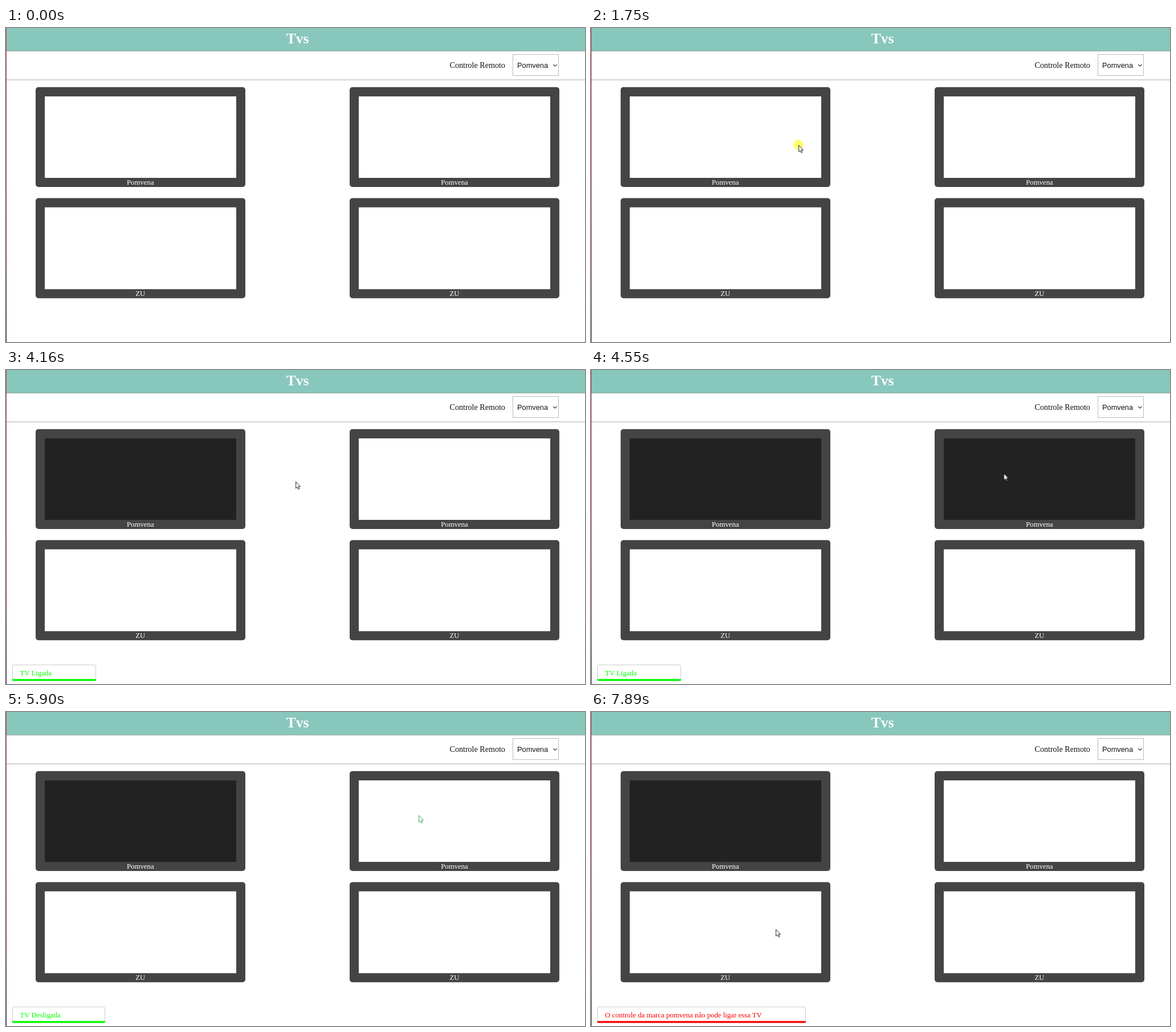
Recreate the animation shown at these times as an HTML page. Size 1016 px wide and 551 px high, loop 8 s.

```html
<!DOCTYPE html>
<html lang="pt-BR">
<head>
<meta charset="utf-8">
<title>Tvs</title>
<style>
  html, body { margin: 0; width: 100%; height: 100%; overflow: hidden; background: #fff; }
  svg { display: block; width: 1016px; height: 551px; }
  text { font: 12.8px "Liberation Serif", "Times New Roman", serif; fill: #fff; }
  .mid { text-anchor: middle; }
  .title { font-size: 25.6px; font-weight: bold; }
  .remote { font-size: 14.08px; fill: #111; }
  .option { font-family: "Liberation Sans", Arial, sans-serif; fill: #111; }
  .frame { fill: #444; }
  .screen { fill: #fff; }

  /* One shared 8 s clock: percent = ms / 80 */
  .anim { animation: 8s step-end infinite; }
  #tv1 { animation-name: tv1; }
  #tv2 { animation-name: tv2; }
  #click { animation-name: click; fill: #ff0; opacity: .55; transform: translate(-50px, -50px); }
  #cursor { animation-name: cursor, tint; fill: #fff; stroke: #000; stroke-width: .9; }
  #on { animation-name: on; }
  #off { animation-name: off; }
  #offBar { animation-name: offBar; }
  #error { animation-name: error; }
  .toast { transform: translateX(-420px); }
  .box { fill: #fff; stroke: #ccc; }
  .green { fill: #0f0; }
  .red { fill: #f00; }

  @keyframes tv1 { 0% { fill: #fff; } 23.5%, 100% { fill: #222; } }
  @keyframes tv2 { 0% { fill: #fff; } 56.875% { fill: #222; } 73.75%, 100% { fill: #fff; } }

  @keyframes click {
    0%, 23.5%, 56.875%, 73.75%, 91.75%, 100% { transform: translate(-50px, -50px); }
    21.875% { transform: translate(364px, 205px); }
    55.25%, 72.875% { transform: translate(724px, 181px); }
    90.875% { transform: translate(324px, 382px); }
  }

  @keyframes cursor {
    0% { transform: translate(668px, 574px); }
    5.75% { transform: translate(668px, 574px); animation-timing-function: steps(7, start); }
    11.6% { transform: translate(521px, 322.5px); }
    13.25% { transform: translate(521px, 322.5px); animation-timing-function: steps(10, start); }
    21.875% { transform: translate(364.5px, 205.5px); }
    50.5% { transform: translate(364.5px, 205.5px); animation-timing-function: steps(5, start); }
    54.875% { transform: translate(724.5px, 181.5px); }
    80.375% { transform: translate(724.5px, 181.5px); animation-timing-function: steps(8, start); }
    87.375% { transform: translate(422.5px, 313.5px); animation-timing-function: steps(4, start); }
    90.875%, 100% { transform: translate(324.5px, 381.5px); }
  }
  @keyframes tint { 0%, 80.375%, 100% { stroke: #000; } 73.75% { stroke: #229a3c; } }

  @keyframes on {
    0% { transform: translateX(-420px); }
    26.875% { transform: translateX(-147px); animation-timing-function: steps(5, start); }
    31.25% { transform: translateX(11px); }
    73.75%, 100% { transform: translateX(-420px); }
  }
  @keyframes off {
    0% { transform: translateX(-420px); }
    73.75% { transform: translateX(11px); }
    84.75% { transform: translateX(11px); animation-timing-function: steps(6, start); }
    90%, 100% { transform: translateX(-187px); }
  }
  @keyframes offBar { 0% { opacity: 1; } 84.75%, 100% { opacity: 0; } }
  @keyframes error {
    0% { transform: translateX(-420px); }
    94.25% { transform: translateX(-366px); animation-timing-function: steps(6, start); }
    99.5%, 100% { transform: translateX(11px); }
  }
</style>
</head>
<body>
<svg viewBox="0 0 1016 551">
  <defs>
    <linearGradient id="edge" x2="0" y2="1">
      <stop offset="0" stop-color="#c23a55"/>
      <stop offset=".45" stop-color="#b02c4a"/>
      <stop offset="1" stop-color="#2a2a30"/>
    </linearGradient>
  </defs>

  <rect width="1016" height="40" fill="#88c7bc"/>
  <rect y="40" width="1016" height="1" fill="#a0a9a7"/>
  <rect y="90.5" width="1016" height="1" fill="#a8a8a8"/>
  <text class="title mid" x="511.6" y="27">Tvs</text>
  <text class="remote" x="778.5" y="70">Controle Remoto</text>
  <rect x="889.5" y="46.5" width="80" height="37" fill="#fff" stroke="#bbb"/>
  <text class="option" x="897" y="70">Pomvena</text>
  <path d="M960.5 64l3 3 3-3" fill="none" stroke="#333" stroke-width="1.1"/>

  <g>
    <rect class="frame" x="52" y="103.7" width="368" height="175.3" rx="5"/>
    <rect class="screen anim" id="tv1" x="68" y="120" width="336" height="143"/>
    <text class="mid" x="235.8" y="275">Pomvena</text>
  </g>
  <g>
    <rect class="frame" x="603" y="103.7" width="368" height="175.3" rx="5"/>
    <rect class="screen anim" id="tv2" x="619" y="120" width="336" height="143"/>
    <text class="mid" x="787" y="275">Pomvena</text>
  </g>
  <g>
    <rect class="frame" x="52" y="298.5" width="368" height="175.8" rx="5"/>
    <rect class="screen" x="68" y="314.7" width="336" height="143.6"/>
    <text class="mid" x="235.8" y="470">ZU</text>
  </g>
  <g>
    <rect class="frame" x="603" y="298.5" width="368" height="175.8" rx="5"/>
    <rect class="screen" x="619" y="314.7" width="336" height="143.6"/>
    <text class="mid" x="787" y="470">ZU</text>
  </g>

  <g class="toast anim" id="on">
    <rect class="box" x=".5" y="517.5" width="146" height="28" rx="2.5"/>
    <rect class="green" y="542.3" width="147" height="3.2" rx="1"/>
    <text class="green" x="13.6" y="536">TV Ligada</text>
  </g>
  <g class="toast anim" id="off">
    <rect class="box" x=".5" y="517.5" width="162" height="28" rx="2.5"/>
    <rect class="green anim" id="offBar" y="542.3" width="163" height="3.2" rx="1"/>
    <text class="green" x="13.6" y="536">TV Desligada</text>
  </g>
  <g class="toast anim" id="error">
    <rect class="box" x=".5" y="517.5" width="365" height="28" rx="2.5"/>
    <rect class="red" y="542.3" width="366" height="3.2" rx="1"/>
    <text class="red" x="13.6" y="536">O controle da marca pomvena não pode ligar essa TV</text>
  </g>

  <rect width="1" height="551" fill="url(#edge)"/>
  <circle class="anim" id="click" r="9"/>
  <path class="anim" id="cursor" d="M0 0V11.8L2.7 9.4 4.5 13.4 6.3 12.6 4.6 8.7H8.1Z"/>
</svg>
</body>
</html>
```
